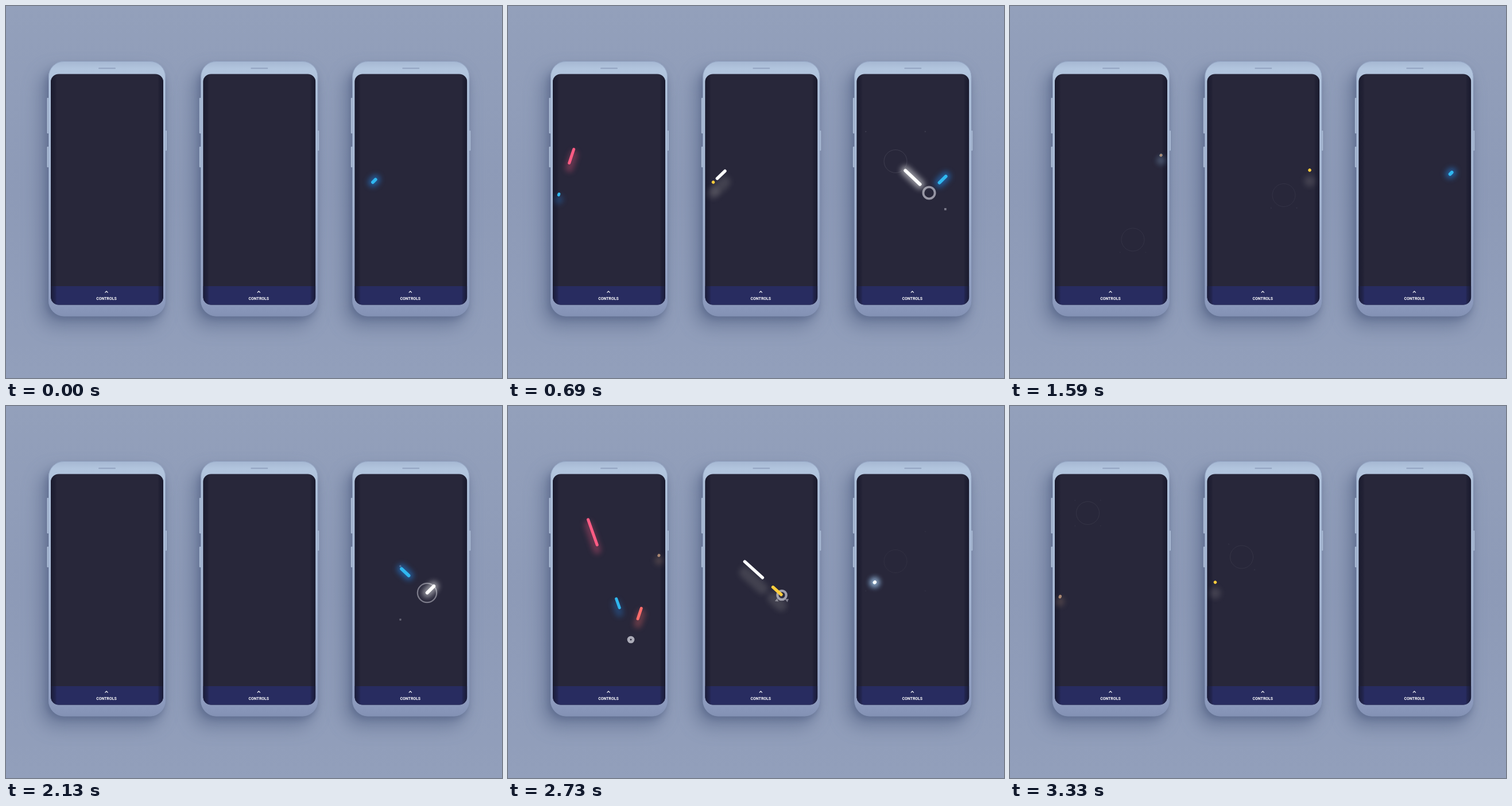
Recreate the animation shown at these times as an HTML page with a canvas. Size 864 px wide and 648 px high, loop 3.36 s.

```html
<!DOCTYPE html>
<html lang="en">
<head>
<meta charset="utf-8">
<title>Controls</title>
<style>
  html, body { margin: 0; width: 864px; height: 648px; overflow: hidden; background: #919eb9; }
  svg, canvas { position: absolute; left: 0; top: 0; display: block; }
  text { font: 700 8px Roboto, sans-serif; font-stretch: condensed; fill: #fff; text-anchor: middle; }
</style>
</head>
<body>
<svg width="864" height="648" viewBox="0 0 864 648">
  <defs>
    <linearGradient id="wall" x2="0" y2="1">
      <stop offset="0" stop-color="#93a0bb"/>
      <stop offset=".5" stop-color="#8d9ab7"/>
      <stop offset="1" stop-color="#929fbb"/>
    </linearGradient>
    <linearGradient id="body" x2="0" y2="1">
      <stop offset="0" stop-color="#a5b7d2"/>
      <stop offset=".03" stop-color="#b2c5de"/>
      <stop offset=".5" stop-color="#a8b9d5"/>
      <stop offset=".93" stop-color="#8f9dc0"/>
      <stop offset="1" stop-color="#8391b4"/>
    </linearGradient>
    <linearGradient id="edge">
      <stop offset="0" stop-color="#15162a" stop-opacity=".75"/>
      <stop offset=".04" stop-color="#15162a" stop-opacity=".3"/>
      <stop offset=".055" stop-color="#15162a" stop-opacity="0"/>
      <stop offset=".95" stop-color="#15162a" stop-opacity="0"/>
      <stop offset=".965" stop-color="#15162a" stop-opacity=".35"/>
      <stop offset="1" stop-color="#15162a" stop-opacity=".75"/>
    </linearGradient>
    <filter id="soft" x="-40%" y="-20%" width="180%" height="140%"><feGaussianBlur stdDeviation="15"/></filter>
    <filter id="near" x="-40%" y="-20%" width="180%" height="140%"><feGaussianBlur stdDeviation="6"/></filter>
    <clipPath id="glass"><rect x="78" y="118.500" width="196" height="402" rx="14"/></clipPath>
    <g id="phone">
      <rect x="58" y="112" width="212" height="448" rx="30" fill="#596789" opacity=".55" filter="url(#soft)"/>
      <rect x="70" y="106" width="206" height="440" rx="28" fill="#4f5d83" opacity=".5" filter="url(#near)"/>
      <g fill="#a9bad4">
        <rect x="71.500" y="160" width="4" height="62" rx="1"/>
        <rect x="71.500" y="245" width="4" height="36" rx="1"/>
        <rect x="276" y="217" width="4" height="35" rx="1"/>
      </g>
      <rect x="74" y="96" width="204" height="444.500" rx="27" fill="url(#body)"/>
      <rect x="74.500" y="96.500" width="203" height="443.500" rx="26.500" fill="none" stroke="#8494b6" stroke-opacity=".6"/>
      <rect x="161" y="107.500" width="30" height="2" rx="1" fill="#91a2bf"/>
      <g clip-path="url(#glass)">
        <rect x="78" y="118" width="196" height="403" fill="#28273a"/>
        <rect x="78" y="488" width="196" height="33" fill="#282c60"/>
        <rect x="78" y="118" width="196" height="403" fill="url(#edge)"/>
      </g>
      <path d="M172.500 499.300 175 496.800 177.500 499.300" fill="none" stroke="#fff" stroke-width="1.200"/>
      <text x="175" y="511.500">CONTROLS</text>
    </g>
  </defs>
  <rect width="864" height="648" fill="url(#wall)"/>
  <use href="#phone"/>
  <use href="#phone" x="265.300"/>
  <use href="#phone" x="529.300"/>
</svg>
<canvas width="864" height="648"></canvas>
<script>
const LOOP = 3360, STEP = 30;
const PINK = '#ff5c84', BLUE = '#30b8f0', CORAL = '#ff6d6b', TAN = '#ab8872', YELLOW = '#ffcd3c', WHITE = '#ffffff';
const ctx = document.querySelector('canvas').getContext('2d');

// dash: colour, start, duration, tail lag, lead-in, hold, ease bias
// ring: node, start, corners that throw a spark (0 TL, 1 TR, 2 BR, 3 BL)
const phones = [
  {
    x: 78, nodes: [[87, 333], [135.500, 186.500], [214, 407], [263, 260]],
    width: 5, glow: { dy: 9, alpha: .3, grow: 9 }, spread: 1.2, spark: 'dot',
    out: [
      [PINK, 481, 793, 34, 40, 50, 1],
      [BLUE, 400, 1160, 25, -240, 10, 1.96],
      [CORAL, 970, 560, 10, 30, 20, 1],
      [TAN, 1036, 540, 6, 20, 50, 1]
    ],
    back: [
      [PINK, 2250, 766, 44, 40, 50, 1],
      [BLUE, 2408, 713, 14, 40, 50, 1],
      [CORAL, 2503, 740, 21, 60, 40, 1],
      [TAN, 2718, 620, 15, 40, 50, 1]
    ],
    rings: [[1, 955, [0, 1]], [2, 1055, [2, 3]], [2, 2680, [0, 2]], [1, 2800, [0, 1, 2, 3]]]
  },
  {
    x: 343.500, nodes: [[357.500, 307], [403.500, 263], [477, 329.500], [522, 286]],
    width: 5.4, glow: { dy: 19, alpha: .17, grow: 14, tint: '#c9c6bd' }, spread: 1.2, spark: 'tri',
    out: [
      [WHITE, 522, 729, 72, 40, 50, 1],
      [YELLOW, 830, 700, 46, 170, 70, 1]
    ],
    back: [
      [WHITE, 2275, 750, 90, 40, 50, 1],
      [YELLOW, 2424, 735, 43, 40, 140, 1]
    ],
    rings: [[1, 950, [0, 1]], [2, 1055, [2, 3]], [2, 2630, [2, 3]], [1, 2800, [0, 2]]]
  },
  {
    x: 607.500, nodes: [[638.500, 307.500], [675, 270.500], [733.500, 325.500], [770.500, 289]],
    width: 5.8, glow: { dy: 0, alpha: .5, grow: 11 }, spread: 2.8, spark: 'box',
    out: [
      [BLUE, -124, 966, 88, 0, 50, 1],
      [WHITE, 239, 800, 97, 30, 30, 1]
    ],
    back: [
      [BLUE, 1461, 1168, 70, 0, 40, 1],
      [WHITE, 1810, 900, 60, 30, 40, 1]
    ],
    rings: [[1, 210, [0, 1]], [2, 555, [1, 2]], [2, 1880, [0, 3]], [1, 2180, [1, 2, 3]]]
  }
];

const clamp = v => Math.max(0, Math.min(1, v));
const ease = (x, bias) => (1 - Math.cos(Math.PI * clamp(x) ** bias)) / 2;

function measure(nodes) {
  const at = [0];
  for (let i = 1; i < nodes.length; i++)
    at.push(at[i - 1] + Math.hypot(nodes[i][0] - nodes[i - 1][0], nodes[i][1] - nodes[i - 1][1]));
  return at;
}

function pointAt(nodes, at, d) {
  let i = 1;
  while (i < at.length - 1 && d > at[i]) i++;
  const k = (d - at[i - 1]) / (at[i] - at[i - 1]);
  return [0, 1].map(n => nodes[i - 1][n] + (nodes[i][n] - nodes[i - 1][n]) * k);
}

function slice(nodes, from, to) {
  const at = measure(nodes), total = at[at.length - 1];
  const a = from * total, b = Math.max(to * total, a + .05);
  const corners = nodes.filter((_, i) => at[i] > a && at[i] < b);
  const path = new Path2D();
  [pointAt(nodes, at, a), ...corners, pointAt(nodes, at, b)].forEach(p => path.lineTo(...p));
  return path;
}

function drawDash(phone, nodes, row, t) {
  const [color, start, span, lag, lead, hold, bias] = row;
  const end = start + span + lag + hold;
  if (t < start - lead || t > end) return;
  const path = slice(nodes, ease((t - start - lag) / span, bias), ease((t - start) / span, bias));
  const { dy, alpha, grow, tint } = phone.glow;
  ctx.save();
  ctx.lineCap = ctx.lineJoin = 'round';
  ctx.save();
  ctx.translate(0, dy);
  ctx.filter = 'blur(5px)';
  ctx.globalAlpha = alpha;
  ctx.strokeStyle = tint || (color === BLUE ? '#2387e8' : color);
  ctx.lineWidth = phone.width + grow;
  ctx.stroke(path);
  ctx.restore();
  ctx.strokeStyle = color;
  ctx.lineWidth = phone.width;
  ctx.stroke(path);
  ctx.restore();
}

function drawSpark(kind, x, y, size, turn) {
  ctx.save();
  ctx.translate(x, y);
  ctx.rotate(turn);
  ctx.beginPath();
  if (kind === 'dot') ctx.arc(0, 0, size * .45, 0, 7);
  else if (kind === 'box') ctx.rect(-size / 2, -size / 2, size, size);
  else {
    ctx.moveTo(0, -size * .8);
    ctx.lineTo(size * .8, size * .6);
    ctx.lineTo(-size * .8, size * .6);
  }
  ctx.fill();
  ctx.restore();
}

function drawRing(phone, [node, start, corners], t) {
  const age = t - start;
  if (age < 0 || age > 600) return;
  const [x, y] = phone.nodes[node];
  const r = 20 * Math.sin(Math.PI / 2 * clamp(age / 400));
  const width = Math.min(2 * r, Math.max(.8, 5.6 * (1 - age / 420)));
  ctx.save();
  ctx.globalAlpha = .8 * (1 - age / 600);
  ctx.strokeStyle = ctx.fillStyle = '#dcdce6';
  ctx.lineWidth = width;
  ctx.beginPath();
  ctx.arc(x, y, r, 0, 7);
  ctx.stroke();
  ctx.globalAlpha *= .75;
  const reach = phone.spread * Math.min(r, 18.5);
  for (const c of corners) {
    const sx = c === 1 || c === 2 ? 1 : -1, sy = c > 1 ? 1 : -1;
    if (age > 60) drawSpark(phone.spark, x + sx * reach, y + sy * reach, 4.4 * (1 - age / 900), c * 1.3 + age / 250);
  }
  ctx.restore();
}

function draw(t) {
  ctx.clearRect(0, 0, 864, 648);
  for (const phone of phones) {
    const reversed = [...phone.nodes].reverse();
    ctx.save();
    ctx.beginPath();
    ctx.roundRect(phone.x, 118.5, 196, 402, 14);
    ctx.clip();
    phone.rings.forEach(ring => drawRing(phone, ring, t));
    phone.out.forEach(row => drawDash(phone, phone.nodes, row, t));
    phone.back.forEach(row => drawDash(phone, reversed, row, t));
    ctx.restore();
  }
}

// Pick the size that suits whichever width of the face is installed.
const label = document.querySelector('text');
ctx.font = '700 condensed 8px Roboto, sans-serif';
label.style.fontSize = Math.min(8.6, 8 * 35.5 / ctx.measureText('CONTROLS').width) + 'px';

const origin = performance.now();
function tick() {
  const t = (performance.now() - origin) % LOOP;
  draw(Math.floor(t / STEP) * STEP);
  requestAnimationFrame(tick);
}
tick();
</script>
</body>
</html>
```
